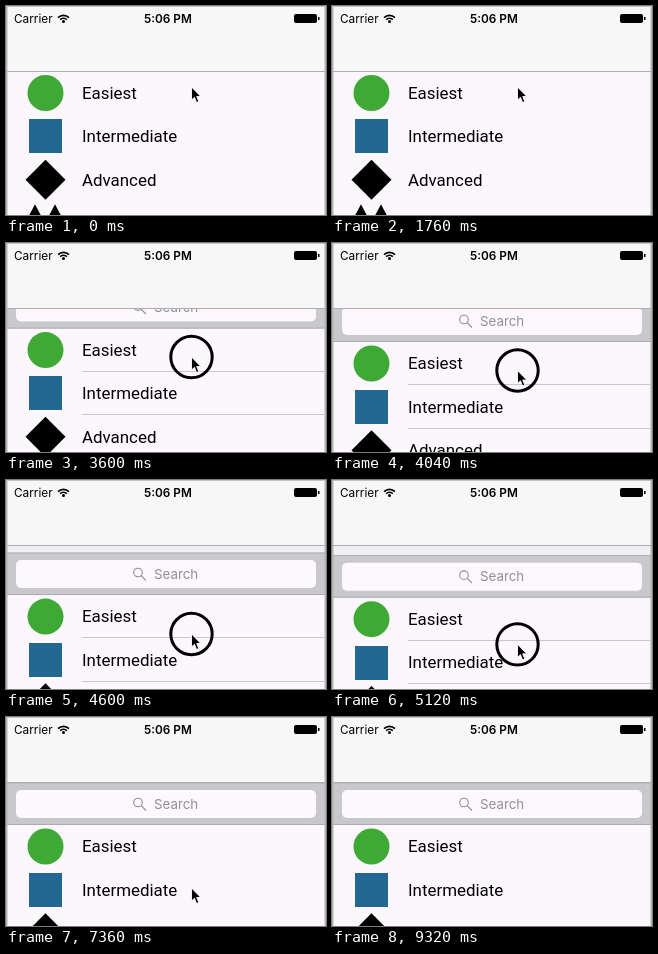
Write an HTML page with a canvas that moves like this. It is 320 by 209 pixels and loops after 9.36 s.

```html
<!DOCTYPE html>
<html lang="en">
<head>
<meta charset="utf-8">
<title>Pull down to search</title>
<style>
  html, body { margin: 0; width: 100%; height: 100%; overflow: hidden; }
  canvas { display: block; }
</style>
</head>
<body>
<canvas id="stage" width="320" height="209"></canvas>
<script>
const ctx = document.getElementById('stage').getContext('2d');
const LOOP = 9360, STEP = 40;
const TOP = 65.5, ROW = 43.4, BAR = 42.5;
const PRESS = 2200, RELEASE = 5840, GRAB_Y = 94;
const LEAVE = 8600, GONE = 8920;

// [time, pointer y]
const PATH = [[2200, 81], [2600, 94], [2800, 94], [2960, 97], [3500, 111], [4040, 127.5],
  [4600, 154], [5000, 163], [5360, 167], [5520, 167], [5800, 171]];

const clamp = v => Math.min(1, Math.max(0, v));

function pointerY(t) {
  if (t <= PATH[0][0]) return PATH[0][1];
  for (let i = 1; i < PATH.length; i++) {
    const [t0, y0] = PATH[i - 1], [t1, y1] = PATH[i];
    if (t < t1) return y0 + (y1 - y0) * (t - t0) / (t1 - t0);
  }
  return PATH[PATH.length - 1][1];
}

// The list follows the pointer, resists past the search bar, then springs back.
function scrollOffset(t) {
  const pull = Math.max(0, pointerY(t) - GRAB_Y);
  const over = Math.max(0, pull - BAR) * 0.55;
  const stretch = over / (1 + over / 26);
  const s = Math.max(0, t - RELEASE - STEP) / 1000 * 8;
  return Math.min(pull, BAR) + stretch * (1 + s) * Math.exp(-s);
}

function rect(x, y, w, h, color) {
  ctx.fillStyle = color;
  ctx.fillRect(x, y, w, h);
}

function text(str, x, y, font, color = '#000') {
  ctx.font = font;
  ctx.fillStyle = color;
  ctx.fillText(str, x, y);
}

function circle(x, y, r, from = 0, to = 7) {
  ctx.beginPath();
  ctx.arc(x, y, r, from, Math.min(to, from + 2 * Math.PI));
}

function polygon(points, color) {
  ctx.beginPath();
  for (const [x, y] of points) ctx.lineTo(x, y);
  ctx.closePath();
  ctx.fillStyle = color;
  ctx.fill();
}

function diamond(x, y, w, h) {
  polygon([[x, y - h], [x + w, y], [x, y + h], [x - w, y]], '#000');
}

function drawStatus() {
  rect(0, 0, 320, TOP, '#f8f7f8');
  text('Carrier', 8, 16.5, '11.8px Inter, sans-serif');
  text('5:06 PM', 138, 16.5, '600 11.8px Inter, sans-serif');
  ctx.strokeStyle = '#000';
  ctx.lineWidth = 1.7;
  for (const r of [4.7, 7.7]) {
    circle(57.5, 17, r, -Math.PI * 0.75, -Math.PI * 0.25);
    ctx.stroke();
  }
  circle(57.5, 15.4, 1.5);
  ctx.fillStyle = '#000';
  ctx.fill();
  ctx.beginPath();
  ctx.roundRect(288, 8, 23, 9, 2);
  ctx.fill();
  rect(312, 11, 1.5, 3, '#000');
}

function drawSearch(y) {
  rect(0, y, 320, BAR, '#c9c8cd');
  rect(0, y, 320, 1, '#adabb0');
  rect(0, y + BAR - 1, 320, 1, '#adabb0');
  ctx.beginPath();
  ctx.roundRect(10, y + 7.5, 300, 28, 5);
  ctx.fillStyle = '#fcf8fc';
  ctx.fill();
  ctx.strokeStyle = '#8e8e93';
  ctx.lineWidth = 1.1;
  circle(132, y + 20, 4.3);
  ctx.moveTo(135.2, y + 23.2);
  ctx.lineTo(140, y + 28);
  ctx.stroke();
  text('Search', 148, y + 26, '13.3px Inter, sans-serif', '#919095');
}

function drawRows(top, separators) {
  rect(0, top, 320, 209, '#fbf7fc');
  const mid = i => top + 21.5 + ROW * i;
  circle(39.5, mid(0), 18);
  ctx.fillStyle = '#3fa936';
  ctx.fill();
  rect(23, Math.round(mid(1) - 17), 33, 34, '#236892');
  diamond(39.5, mid(2), 20, 20);
  diamond(29, mid(3), 10, 19);
  diamond(49, mid(3), 10, 19);
  ['Easiest', 'Intermediate', 'Advanced'].forEach((name, i) => {
    text(name, 76, mid(i) + 5.7, '16.9px Roboto, sans-serif');
    if (separators) rect(76, Math.round(top + ROW * (i + 1) - 1), 242, 1, '#c8c6cb');
  });
}

function drawPointer(t) {
  if (t >= GONE) return;
  const leave = clamp((t - LEAVE) / (GONE - LEAVE)) ** 2;
  const x = 185.5 + 94 * leave, y = pointerY(t) - 30 * leave;
  if (t >= PRESS && t < RELEASE) {
    ctx.globalAlpha = clamp((t - PRESS + STEP) / 160);
    ctx.strokeStyle = '#000';
    ctx.lineWidth = 3;
    circle(x, y, 20.7);
    ctx.stroke();
    ctx.globalAlpha = 1;
  }
  const arrow = [[0, 0], [0, 13], [3, 10.3], [5, 15.5], [7.3, 14.5], [5.2, 9.5], [9.3, 9.5]];
  polygon(arrow.map(([px, py]) => [x + px, y + py]), '#000');
  ctx.strokeStyle = '#fff';
  ctx.lineWidth = 0.9;
  ctx.stroke();
}

function draw(t) {
  const offset = scrollOffset(t), top = TOP + offset;
  rect(0, 0, 320, 209, '#f0eff4');
  drawRows(top, t > 3000 && t < 5400);
  if (offset > 0) drawSearch(top - BAR);
  drawStatus();
  rect(0, 65, 320, 1, '#b3abb4');
  rect(0, 0, 320, 1, '#c4c2c4');
  rect(0, 0, 1.5, 209, '#b4b2b4');
  rect(318.5, 0, 1.5, 209, '#b4b2b4');
  drawPointer(t);
}

const start = performance.now();
function tick() {
  const t = (performance.now() - start) % LOOP;
  draw(Math.floor(t / STEP) * STEP);
  requestAnimationFrame(tick);
}
tick();
</script>
</body>
</html>
```
